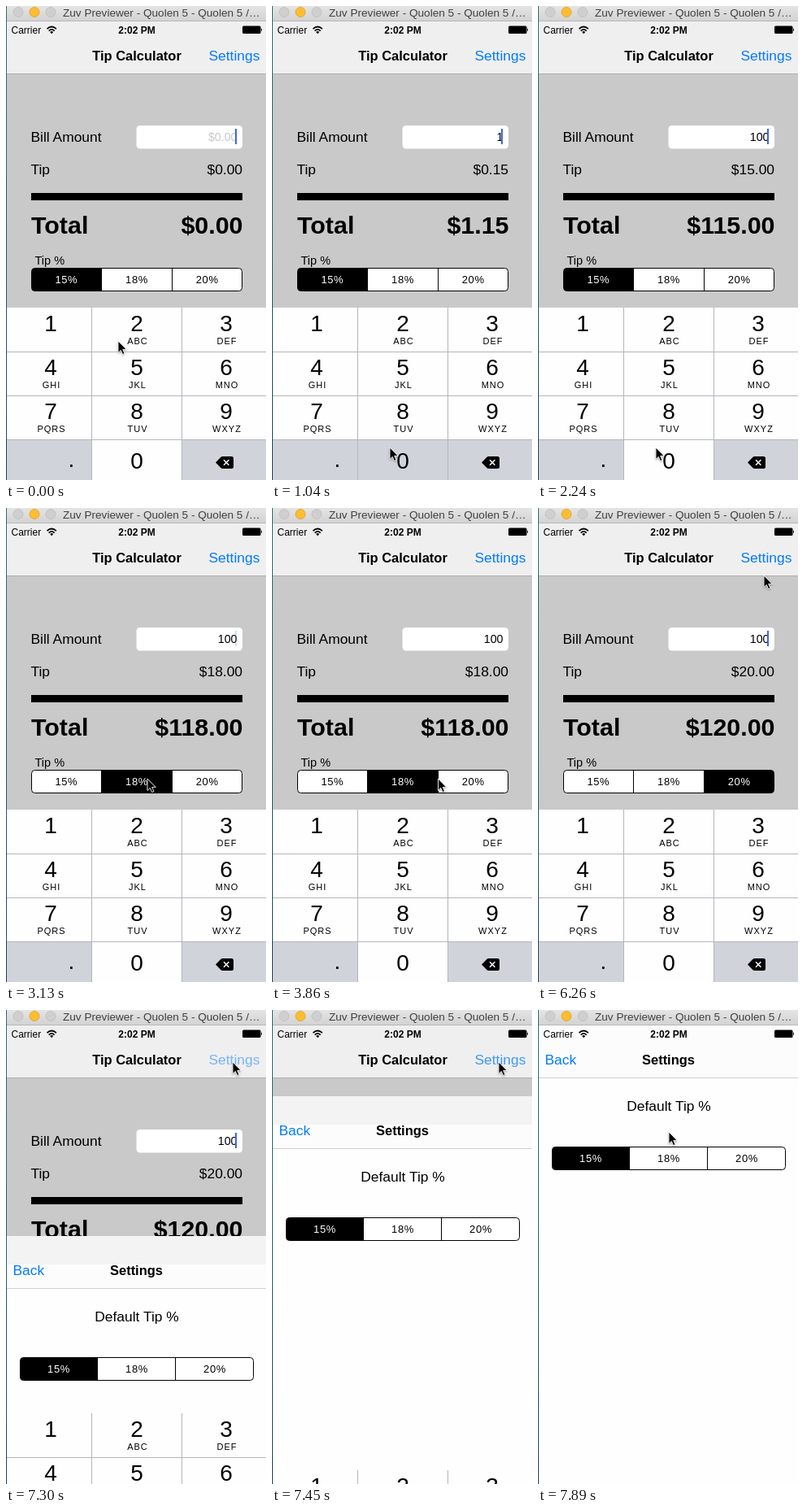
These frames come from a looping animation (320x583 px, 8000 ms). An HTML page:

```html
<!DOCTYPE html>
<html lang="en">
<head>
<meta charset="utf-8">
<title>Tip Calculator</title>
<style>
  html, body { margin: 0; width: 100%; height: 100%; overflow: hidden; background: #fefefe; }
  svg { display: block; font-family: "Liberation Sans", Arial, sans-serif; }
  text { white-space: pre; }
  .label { font-size: 17.400px; }
  .title { font-size: 16.500px; font-weight: bold; text-anchor: middle; }
  .total { font-size: 30.400px; font-weight: bold; }
  .small { font-size: 14.500px; }
  .option { font-size: 13px; letter-spacing: .6px; text-anchor: middle; }
  .field { font-size: 14.200px; }
  .digit { font-size: 28px; text-anchor: middle; }
  .letters { font-size: 11px; letter-spacing: 1px; text-anchor: middle; }
  .status { font-size: 12px; }
  .end { text-anchor: end; }
  .mid { text-anchor: middle; }
  .link { fill: #007aff; }
  #pointer { filter: drop-shadow(0 1px 1px rgba(0, 0, 0, .35)); }
</style>
</head>
<body>
<svg width="320" height="583" viewBox="0 0 320 583">
  <defs>
    <linearGradient id="edge" x2="0" y2="1">
      <stop offset="0" stop-color="#2c6f70"/>
      <stop offset=".5" stop-color="#1f6564"/>
      <stop offset="1" stop-color="#22405c"/>
    </linearGradient>
    <linearGradient id="chrome" x2="0" y2="1">
      <stop offset="0" stop-color="#e4e4e4"/>
      <stop offset="1" stop-color="#d2d2d2"/>
    </linearGradient>
  </defs>

  <g id="main">
    <rect y="83" width="320" height="500" fill="#c9c9c9"/>
    <rect y="19" width="320" height="64" fill="#efefef"/>
    <rect y="83" width="320" height="1" fill="#aeaeae"/>
    <text class="title" x="161" y="67">Tip Calculator</text>
    <text class="label link" id="settings" x="249.500" y="67">Settings</text>
    <text class="label" x="30.500" y="166.500">Bill Amount</text>
    <rect x="160.500" y="147" width="130.500" height="28.500" rx="4.500" fill="#fff"/>
    <text class="field end" id="bill" x="284.500" y="166"></text>
    <rect id="caret" x="282" y="151" width="2" height="19" fill="#4263e2"/>
    <text class="label" x="30.500" y="206.500">Tip</text>
    <text class="label end" id="tip" x="291" y="206.500"></text>
    <rect x="31" y="230" width="260" height="9"/>
    <text class="total" x="31" y="280">Total</text>
    <text class="total end" id="total" x="291.500" y="280"></text>
    <text class="small" x="35.500" y="318">Tip %</text>
  </g>

  <g id="sheet">
    <rect y="19" width="320" height="564" fill="#fefefe"/>
    <rect y="19" width="320" height="64" fill="#fcfcfc"/>
    <rect id="shade" y="19" width="320" height="35" fill="#f3f3f3"/>
    <rect y="83" width="320" height="1" fill="#cfcfcf"/>
    <text class="label link" x="8.500" y="67">Back</text>
    <text class="title" x="160.500" y="67">Settings</text>
    <text class="label mid" x="161" y="123.500">Default Tip %</text>
  </g>

  <g id="pad"></g>

  <g id="statusBar">
    <text class="status" x="6.500" y="33.500">Carrier</text>
    <path d="M50.500 28.200Q56.200 22.800 61.900 28.200M52.700 30.600Q56.200 27.200 59.700 30.600"
          fill="none" stroke="#000" stroke-width="1.700"/>
    <path d="M54.200 32Q56.200 30.200 58.200 32L56.200 34.200Z"/>
    <text class="status mid" x="161" y="33.500" font-weight="bold">2:02 PM</text>
    <rect x="291" y="24.500" width="22.500" height="9.500" rx="1.500"/>
    <path d="M314 27.300q2 2 0 4z"/>
  </g>

  <g id="windowBar">
    <rect width="320" height="19" fill="url(#chrome)"/>
    <rect y="18" width="320" height="1" fill="#b9b9b9"/>
    <g stroke-width=".8">
      <circle cx="15" cy="7.500" r="6" fill="#cfcfcf" stroke="#bdbdbd"/>
      <circle cx="35" cy="7.500" r="6" fill="#fdbc32" stroke="#dfa023"/>
      <circle cx="55" cy="7.500" r="6" fill="#cfcfcf" stroke="#bdbdbd"/>
    </g>
    <text x="70" y="13" font-size="13.600" fill="#404040">Zuv Previewer - Quolen 5 - Quolen 5 /…</text>
  </g>
  <rect width="1" height="583" fill="url(#edge)"/>

  <path id="pointer" d="M0 0V14.500L3.300 11.400L5.600 16.600L8 15.500L5.700 10.400H10.200Z" stroke="#fff" stroke-width=".9"/>
</svg>

<script>
const LOOP = 8000;
const TICK = 148.9;
const PERCENTS = [15, 18, 20];
const WHITE = "#fefefe", GREY = "#d0d4da";
const $ = id => document.getElementById(id);

function add(parent, tag, attrs, text) {
  const el = document.createElementNS("http://www.w3.org/2000/svg", tag);
  for (const key in attrs) el.setAttribute(key, attrs[key]);
  if (text !== undefined) el.textContent = text;
  parent.append(el);
  return el;
}

// Builds a segmented control and returns a function that selects one option.
function segments(parent, x, y, width) {
  const step = width / 3, height = 29;
  const clip = add(parent, "clipPath", { id: parent.id + "Clip" });
  const box = { x: x + .5, y: y + .5, width: width - 1, height: height - 1, rx: 4 };
  add(clip, "rect", box);
  add(parent, "rect", { ...box, fill: "#fff" });
  const mark = add(parent, "rect", { y, width: step, height, "clip-path": `url(#${clip.id})` });
  for (const i of [1, 2])
    add(parent, "rect", { x: Math.ceil(x + step * i) - 1, y, width: 1, height });
  add(parent, "rect", { ...box, fill: "none", stroke: "#000" });
  const labels = PERCENTS.map((p, i) => add(parent, "text", {
    class: "option", x: x + step * (i + .5), y: y + 19
  }, p + "%"));
  return chosen => {
    mark.setAttribute("x", x + step * chosen);
    labels.forEach((el, i) => el.setAttribute("fill", i === chosen ? "#fff" : "#000"));
  };
}

// Builds the number pad and returns its key backgrounds by label.
function buildPad(parent) {
  const keys = {};
  const letters = ["", "ABC", "DEF", "GHI", "JKL", "MNO", "PQRS", "TUV", "WXYZ"];
  [..."123456789.0<"].forEach((name, i) => {
    const col = i % 3, x = 1 + 108 * col - 3 * (col === 1), y = 371 + 54 * Math.floor(i / 3);
    const middle = 55 + 108 * col - 2 * (col === 1);
    const digit = name >= "0" && name <= "9";
    keys[name] = add(parent, "rect", { x, y, width: 112, height: 54, fill: digit ? WHITE : GREY });
    if (digit) add(parent, "text", { class: "digit", x: middle, y: y + (name === "0" ? 36 : 29) }, name);
    if (letters[i]) add(parent, "text", { class: "letters", x: middle + 1, y: y + 45 }, letters[i]);
  });
  add(parent, "text", { class: "digit", x: 80.5, y: 567 }, ".");
  add(parent, "path", {
    d: "M258 561.5L264.300 555Q265.300 554 266.500 554H277.500Q280 554 280 556.500V566.500Q280 569 277.500 569H266.500Q265.300 569 264.300 568Z"
  });
  add(parent, "path", {
    d: "M268 558.300l6.400 6.400m0-6.400l-6.400 6.400", stroke: "#fff", "stroke-width": 1.5
  });
  const line = { fill: "#b3b6ba" };
  for (const y of [425, 479, 533]) add(parent, "rect", { x: 1, y, width: 319, height: 1, ...line });
  for (const x of [105, 216]) add(parent, "rect", { x, y: 371, width: 1, height: 212, ...line });
  return keys;
}

// The user's actions, timed in ticks.
const moves = [
  { from: 0, to: 3, x: 52, y: 391 },
  { from: 4, to: 7, x: 145, y: 543 },
  { from: 16, to: 19, x: 174, y: 333 },
  { from: 24, to: 26, x: 235, y: 333 },
  { from: 37, to: 40, x: 147, y: 190 },
  { from: 40, to: 42, x: 278, y: 83 },
  { from: 42, to: 44, x: 279, y: 64 },
  { from: 51, to: 53, x: 161, y: 150 }
];
const taps = [
  { key: "1", down: 3, up: 4 },
  { key: "0", down: 7, up: 8 },
  { key: "0", down: 13, up: 14 }
];
const optionTaps = [21, 31];
const sheetOpen = 48, sheetTicks = 4;

const clamp = v => Math.min(1, Math.max(0, v));
const smooth = p => p * p * (3 - 2 * p);
const easeOut = p => 1 - (1 - p) ** 2.7;
const money = value => "$" + value.toFixed(2);
const shift = (id, x, y) => $(id).setAttribute("transform", `translate(${x} ${y})`);

function pointerAt(k) {
  let x = 138, y = 412;
  for (const m of moves) {
    const p = smooth(clamp((k - m.from) / (m.to - m.from)));
    x += (m.x - x) * p;
    y += (m.y - y) * p;
  }
  return [x, y];
}

// The caret blinks softly and starts afresh after each key.
function caretAt(k, lastKey) {
  return clamp(.5 + 1.2 * Math.cos((k - lastKey - 2.2) / 6.7 * 2 * Math.PI));
}

const chooseTip = segments($("main"), 31, 322, 260);
const chooseDefault = segments($("sheet"), 17, 168, 288);
const keys = buildPad($("pad"));
chooseDefault(0);

function draw(k) {
  const typed = taps.filter(tap => tap.up <= k);
  const held = taps.find(tap => tap.down <= k && k < tap.up);
  const bill = Number(typed.map(tap => tap.key).join(""));
  const option = optionTaps.filter(time => time <= k).length;
  const tip = bill * PERCENTS[option] / 100;
  $("bill").textContent = bill || money(0);
  $("bill").setAttribute("fill", bill ? "#000" : "#c7c7cc");
  $("tip").textContent = money(tip);
  $("total").textContent = money(bill + tip);
  $("caret").setAttribute("opacity", caretAt(k, typed.length ? typed.at(-1).up : -1));
  chooseTip(option);
  for (const { key } of taps) keys[key].setAttribute("fill", held?.key === key ? GREY : WHITE);

  const sinceOpen = k - sheetOpen;
  const slide = easeOut(clamp(sinceOpen / sheetTicks));
  $("settings").setAttribute("opacity", sinceOpen < 0 ? 1 : clamp((sinceOpen + 1) / 4));
  $("shade").setAttribute("opacity", slide < 1 ? 1 : 0);
  shift("sheet", 0, Math.round(564 * (1 - slide)));
  shift("pad", 0, Math.round(231 * slide));
  shift("pointer", ...pointerAt(k));
}

const start = performance.now();
function tick() {
  const t = (performance.now() - start) % LOOP;
  draw(Math.floor((t + 10) / TICK));
  requestAnimationFrame(tick);
}
tick();
</script>
</body>
</html>
```
